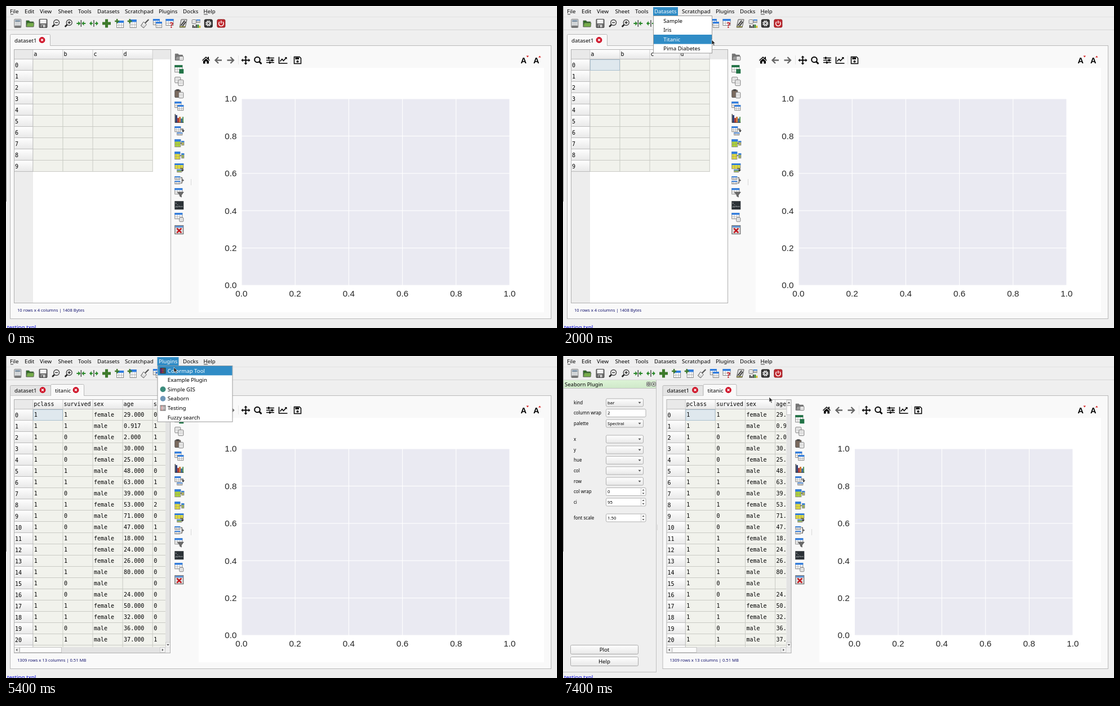
Animation of 978x573 px, one loop 8000 ms. Source, as an HTML page:

```html
<!DOCTYPE html>
<html lang="en">
<head>
<meta charset="utf-8">
<title>Table app demo</title>
<style>
html, body { margin: 0; width: 100%; height: 100%; overflow: hidden; background: #efefef; }
svg { display: block; width: 100vw; height: 100vh; }
text { font-family: "Noto Sans", "Open Sans", sans-serif; white-space: pre; }
.mono { font-family: "DejaVu Sans Mono", monospace; }
.plot { font-family: "Liberation Sans", Arial, sans-serif; }
</style>
</head>
<body>
<svg id="stage" viewBox="0 0 978 573">
  <defs>
    <linearGradient id="head" x2="0" y2="1"><stop stop-color="#fefefe"/><stop offset="1" stop-color="#e8e8e8"/></linearGradient>
    <linearGradient id="dock" x2="0" y2="1"><stop stop-color="#dcf3d6"/><stop offset="1" stop-color="#cfe8c9"/></linearGradient>
  </defs>
</svg>
<script>
const stage = document.getElementById('stage');
const BLUE = '#308cc6', LINE = '#b9b9b9', GRID = '#c9cac4';

// Markup helpers
const box = (x, y, w, h, fill, more = '') => `<rect x="${x}" y="${y}" width="${w}" height="${h}" fill="${fill}" ${more}/>`;
const frame = (x, y, w, h, fill, line = LINE, r = 0) => box(x + .5, y + .5, w - 1, h - 1, fill, `stroke="${line}" rx="${r}"`);
const text = (x, y, s, size = 9.7, more = '') => `<text x="${x}" y="${y}" font-size="${size}" ${more}>${s}</text>`;
const mono = (x, y, s) => text(x, y, s, 10, 'class="mono"');
const path = (d, fill, line = 'none', w = 1) => `<path d="${d}" fill="${fill}" stroke="${line}" stroke-width="${w}"/>`;
const dot = (x, y, r, fill, more = '') => `<circle cx="${x}" cy="${y}" r="${r}" fill="${fill}" ${more}/>`;
const at = (x, y, s) => `<g transform="translate(${x} ${y})">${s}</g>`;
const range = n => [...Array(n).keys()];

// Icon parts, drawn around 0,0
const page = (x, y, w, h, fill = '#f6f6f6') => frame(x, y, w, h, fill, '#777', 1) +
  range(Math.floor((h - 4) / 2)).map(i => box(x + 2, y + 3 + i * 2, w - 4, .6, '#aaa')).join('');
const table = (x, y, w, h, fill = '#fff', top = '#2f7de0') => frame(x, y, w, h, fill, '#858585') + box(x, y, w, h * .3, top) +
  path(`M${x + w / 3} ${y + h * .3}v${h * .7}m${w / 3} 0v${-h * .7}M${x} ${y + h * .62}h${w}`, 'none', '#8a8a8a', .6);
const lens = sign => path('M-1 1L-6 6', 'none', '#222', 2.6) + dot(1.5, -1.5, 5, '#eee', 'stroke="#444" stroke-width="1.3"') + path(sign, 'none', '#222', 1.3);
const chevrons = s => path(s, '#2c8a2c') + box(-.7, -6, 1.4, 12, '#444');
const bars = (x, y, heights, colors) => colors.map((c, i) => box(x + i * 3, y - heights[i], 2.6, heights[i], c)).join('');
const plus = (x, y, r, w) => path(`M${x - r} ${y}h${2 * r}M${x} ${y - r}v${2 * r}`, 'none', '#3d7a2b', w);
const arrow = (x, y) => path(`M${x} ${y}h4v4m-2 -2l2 2.5l2 -2.5`, 'none', '#333', 1.2);
const cross = (x, y, r, color, w) => path(`M${x - r} ${y - r}l${2 * r} ${2 * r}m0 ${-2 * r}l${-2 * r} ${2 * r}`, 'none', color, w);
const folder = (back, front) => path('M-7 6V-5h5l1.5 2H6v9z', back, '#555', .7) + path('M-7 6l2-7H7l-1 7z', front, '#555', .7);

const toolIcons = [
  page(-6, -8, 13, 16, '#e3e7ea') + box(-4, -6, 9, 3, '#7f93a6') + box(-5, 4, 11, 3, '#777'),
  folder('#2e6e25', '#75ad49'),
  frame(-7, -8, 15, 16, '#6a6a6a', '#444', 1) + box(-5, -7, 11, 7, '#f0f0f0') + box(-3, 2, 7, 5, '#c9c9c9') + box(-2, 3, 2, 4, '#444'),
  lens('M-1 -1.5h5'),
  lens('M-1 -1.5h5M1.5 -4v5'),
  chevrons('M-8 -1h3v-3l4 4l-4 4v-3h-3zM8 -1h-3v-3l-4 4l4 4v-3h3z'),
  chevrons('M-2 -1h-2v-3l-4 4l4 4v-3h2zM2 -1h2v-3l4 4l-4 4v-3h-2z'),
  plus(0, 0, 7.5, 5),
  table(-5, -5, 13, 13) + plus(-4, -4, 4, 2.4),
  table(-4, -7, 12, 15) + plus(-4, -4, 4, 2.4),
  path('M7 -7L0 0', 'none', '#555', 2.2) + path('M-2 -3L3 2L-2 8L-7 4z', '#f3f3f3', '#555') + path('M-4 0L-5 6M-1 2L-3 7', 'none', '#999', .7),
  table(-8, -8, 12, 11) + table(-3, -3, 11, 11),
  table(-8, -8, 14, 12) + text(-1, 8, '?', 14, 'fill="#c01c28" font-weight="700"'),
  path('M-6 7L-3 -7H7L4 7z', '#ddd', '#555') + path('M-4 4L3 -5M-1 5L5 -3', 'none', '#333', 1.8) + box(-6, 5, 10, 2, '#884'),
  page(-7, -7, 8, 8) + bars(-6, 8, [5, 3, 6], ['#4a4a4a', '#4a4a4a', '#4a4a4a']) + table(1, -7, 7, 6) + bars(3, 8, [6, 4], ['#3b8f31', '#d6b725']),
  frame(-7.5, -7.5, 15, 15, '#333', '#222', 2) + dot(0, 0, 4, 'none', 'stroke="#eee" stroke-width="2.4" stroke-dasharray="2.2 .9"') + dot(0, 0, 3, '#ddd') + dot(0, 0, 1.4, '#333'),
  frame(-7.5, -7.5, 15, 15, '#c2272d', '#8c1a1e', 2) + path('M-2.6 -3A4.2 4.2 0 1 0 2.6 -3M0 -5V0', 'none', '#fff', 1.5)
];
const lime = '#b2de2c', lemon = '#efe92f';
const sideIcons = [
  folder('#777', '#999') + page(0, -1, 8, 8),
  table(-8, -7, 14, 13, '#fff', '#217346') + box(0, 0, 8, 8, '#217346'),
  page(-8, -8, 11, 11) + page(-2, -3, 10, 11),
  frame(-8, -7, 11, 14, '#7a6a5e', '#555', 1) + box(-5, -8, 5, 3, '#444') + page(-1, -3, 9, 11),
  table(-8, -8, 12, 11) + table(-3, -2, 11, 10),
  path('M-7 -8V7H8', 'none', '#222', 1.2) + bars(-6, 7, [13, 8, 10, 7], ['#1b2f6b', '#a31f1f', '#c9661a', '#2a5d8f']) + box(6, -3, 1.6, 10, '#2f7d32'),
  table(-8, -8, 11, 10) + arrow(3, -3) + table(-4, 3, 10, 5),
  table(-8, -7, 11, 14, lime) + table(4, -4, 5, 8, lemon) + box(2, -.5, 3, 1, '#333'),
  table(-8, -7, 10, 14, lemon) + table(4, -4, 5, 9, lime) + box(1, -.5, 3, 1, '#333'),
  table(-8, -8, 16, 10, lemon) + table(-4, 3, 9, 5, lime) + arrow(2, 1),
  table(-8, -7, 10, 6) + table(-8, 1, 10, 6) + path('M3 -5h2v10h-2M5 0h3m-2 -2l2 2l-2 2', 'none', '#333'),
  table(-8, -8, 14, 11) + path('M-3 -1H8L4 4v4l-3 -2V4z', '#6b6b6b', '#444', .7),
  box(-8, -7, 16, 15, '#2b3136') + text(-7, -1, '&gt;_', 5, 'fill="#fff"') + text(-6.5, 4, 'python', 4, 'fill="#d8dde0"'),
  table(-8, -8, 14, 11) + page(0, 0, 8, 8),
  frame(-8, -8, 16, 16, '#ddd', '#555') + box(-7, -7, 14, 3, '#5b8fd0') + cross(0, 1.5, 4, '#c3141c', 2.6)
];
const sideY = i => 90.2 + i * 22;
const shaft = 'M6 0H-5M0 -5.5L-5.5 0L0 5.5';
const navIcons = [
  [355, path('M-7 0L0 -6.5L7 0L6 1L0 -4.5L-6 1zM-5 1.5L0 -3L5 1.5V6H1.4V2H-1.4V6H-5z', '#000') + box(3, -6, 2, 4, '#000')],
  [377, path(shaft, 'none', '#666', 2.3)],
  [398.5, `<g transform="scale(-1 1)">${path(shaft, 'none', '#666', 2.3)}</g>`],
  [425.5, path('M-6 0H6M0 -6V6', 'none', '#000', 1.8) + path('M-8 0l3-3v6zM8 0l-3-3v6zM0 -8l-3 3h6zM0 8l-3-3h6z', '#000')],
  [447, dot(-1, -1, 4.8, 'none', 'stroke="#000" stroke-width="2"') + path('M2.5 2.5L6.5 6.5', 'none', '#000', 2.8)],
  [469, path('M-7 -4H7M-7 0H7M-7 4H7', 'none', '#000', 1.4) + box(-4, -6, 2.6, 4, '#000') + box(2, -2, 2.6, 4, '#000') + box(-2, 2, 2.6, 4, '#000')],
  [491.5, path('M-7 -6V5.5H8M-5 2L-1.5 -2L1 1L6 -4.5', 'none', '#000', 1.6) + path('M3 -5.5H7V-1.5z', '#000')],
  [517.5, path('M-6 -6H3.5L6 -3.5V6H-6z', 'none', '#000', 1.5) + box(-4, -5, 6.5, 3.5, '#000') + dot(0, 2.2, 2, '#000')]
];

const menus = [['File', 7], ['Edit', 33], ['View', 60], ['Sheet', 92.5], ['Tools', 128], ['Datasets', 162],
  ['Scratchpad', 211], ['Plugins', 271], ['Docks', 314], ['Help', 350.5]];

function chrome() {
  return box(0, 0, 978, 573, '#efefef') + box(0, 0, 978, 1, '#fafafa') + box(0, 19, 978, 1, '#e2e2e2') + box(0, 42, 978, 1, '#d6d6d6') +
    box(0, 0, 1, 348, '#8a8a8a') +
    menus.map(([s, x]) => text(x, 13, s)).join('') + box(8, 14.5, 5, .8, '#111') + box(351, 14.5, 7, .8, '#111') +
    toolIcons.map((s, i) => at(20.3 + i * 22.6, 31, s)).join('') +
    text(2, 575, 'testing.txpl', 9.7, 'fill="#0000e0"');
}

function tab(x, w, name, active) {
  const y = active ? 50 : 52;
  return path(`M${x + .5} 70.5V${y + 2.5}q0 -2 2 -2H${x + w - 2.5}q2 0 2 2V70.5`, active ? '#f9f9f9' : '#e4e4e4', LINE) +
    text(x + 8, 64.5, name) + at(x + w - 15, 60.5, dot(0, 0, 5.4, '#cf1126') + cross(0, 0, 2, '#fff', 1.5));
}

const survived = '110001101001111001101', sibs = '011110102011000000001', sexes = 'fmfmfmfmfmmfffmmmffmm';
const ages = [29, .917, 2, 30, 25, 48, 63, 39, 53, 71, 47, 18, 24, 26, 80, null, 24, 50, 32, 36, 37];
const cells = i => [1, survived[i], sexes[i] === 'f' ? 'female' : 'male', ages[i] === null ? '' : ages[i].toFixed(3), sibs[i]];
const selection = frame(48, 95, 53, 20, '#dfe8ee', '#a9bfce');

// Data sheet at the left side of the pane; w is the outer width
function sheet(w, loaded) {
  const right = loaded ? 5 + w : 14 + w, rows = loaded ? 22 : 10, cols = loaded ? 5 : 4;
  const end = 95 + rows * 20, edge = 48 + cols * 53.1, id = 'view' + w + rows;
  const names = loaded ? ['pclass', 'survived', 'sex', 'age', 'sibsp'] : ['a', 'b', 'c', 'd'];
  let s = box(15, 78, right - 15, loaded ? 440 : 450, '#fff') + box(15, 78, right - 15, 17, '#e9e9e9') + box(15, 95, 33, 433, '#ededed') +
    box(48, 78, edge - 48, 17, 'url(#head)') + box(48, 95, edge - 48, rows * 20, '#f1f2ec');
  for (let i = 0; i < rows; i++) {
    const y = 95 + i * 20;
    s += box(15, y, 33, 20, 'url(#head)') + box(15, y + 19, 33, 1, '#bbb') + box(48, y + 19, edge - 48, 1, GRID);
    if (i < 21) s += mono(16, y + 13.5, i);
  }
  for (let c = 0; c <= cols; c++) {
    const x = 47.3 + c * 53.1;
    s += box(x, 78, 1, 17, '#ccc') + box(x, 95, 1, end - 95, c ? GRID : '#bbb');
  }
  s += box(15, 94, edge - 15, 1, '#bbb');
  if (loaded) s += selection;
  names.forEach((n, c) => s += mono(49.3 + c * 53.1, 88.5, n));
  if (loaded) range(21).forEach(i => cells(i).forEach((v, c) => s += mono(49.8 + c * 53.1, 108 + i * 20, v)));
  s = `<clipPath id="${id}">${box(14, 77, right - 14, loaded ? 441 : 451, '#000')}</clipPath><g clip-path="url(#${id})">${s}</g>`;
  if (loaded) {
    const track = right - 34, tip = (x, y, d) => at(x, y, path(d, '#555'));
    s += box(right, 78, 9, 440, '#e3e3e3') + frame(right, 78, 9, 10, '#f3f3f3', '#ccc') + frame(right, 88, 9, 17, '#fafafa', '#c4c4c4') + frame(right, 509, 9, 10, '#f3f3f3', '#ccc') +
      tip(right + 4.5, 83, 'M-2.3 1.2L0 -1.5L2.3 1.2z') + tip(right + 4.5, 514, 'M-2.3 -1.2L0 1.5L2.3 -1.2z') +
      box(15, 518, w - 2, 10, '#e3e3e3') + frame(14, 518, 10, 10, '#f3f3f3', '#ccc') + frame(24, 518, Math.round(track * (right - 48) / 781), 10, '#fafafa', '#c4c4c4') +
      frame(right - 10, 518, 10, 10, '#f3f3f3', '#ccc') + box(right, 519, 9, 9, '#efefef') +
      tip(19, 523, 'M1.2 -2.3L-1.5 0L1.2 2.3z') + tip(right - 5, 523, 'M-1.2 -2.3L1.5 0L-1.2 2.3z');
  }
  return s + frame(14, 77, w, 452, 'none', '#b0b0b0') +
    text(20, 543.5, loaded ? '1309 rows x 13 columns | 0.51 MB' : '10 rows x 4 columns | 1408 Bytes', 7.6, 'fill="#14146e"');
}

function plot(dx, x0, x1) {
  const label = 'class="plot" fill="#262626" text-anchor=';
  let s = box(342 + dx, 110, 613 - dx, 435, '#fff') + box(x0, 165, x1 - x0, 332, '#eaeaf2');
  range(6).forEach(i => {
    const x = x0 + (x1 - x0) * i / 5, y = 497 - i * 66.4, v = (i / 5).toFixed(1);
    s += box(x - .5, 165, 1.1, 332, '#fff') + box(x0, y - .5, x1 - x0, 1.1, '#fff') +
      text(x, 517, v, 15.3, label + '"middle"') + text(x0 - 8.5, y + 5.4, v, 15.3, label + '"end"');
  });
  return s;
}

function layout(left, dx, w, loaded, x0, x1) {
  const tabs = loaded ? tab(7, 73, 'dataset1', false) + tab(79, 60, 'titanic', true) : tab(7, 72, 'dataset1', true);
  const gap = loaded ? [79, 60] : [7, 72];
  const letter = (x, d) => at(x, 96, text(-5.5, 5.5, 'A', 14.5, 'class="plot" font-weight="700"') + path(d, '#d81e1e'));
  return frame(left + 7, 70, 961 - left, 487, '#f9f9f9') +
    at(left, 0, tabs + box(gap[0] + 1, 70, gap[1] - 2, 1, '#f9f9f9') + sheet(w, loaded)) +
    sideIcons.map((s, i) => at(307.3 + dx, sideY(i), s)).join('') + box(328 + dx, 308, 1, 11, '#d9d9d9') +
    plot(dx, x0, x1) +
    navIcons.map(([x, s]) => at(x + dx, 96.5, s)).join('') + box(412 + dx, 88, 1, 16, '#e6e6e6') + box(505 + dx, 88, 1, 16, '#e6e6e6') +
    letter(919, 'M4.5 -7.5h4.5l-2.2 3z') + letter(941.5, 'M3.5 -4.5h4.5l-2.2 -3z');
}

// Side panel with its form
function panel() {
  const rows = [['kind', 83, 'bar', 'c'], ['column wrap', 101.5, '2', 'e'], ['palette', 120, 'Spectral', 'c'], ['x', 148, '', 'c'], ['y', 167, '', 'c'],
    ['hue', 185.5, '', 'c'], ['col', 204, '', 'c'], ['row', 223, '', 'c'], ['col wrap', 241.5, '0', 's'], ['ci', 260, '95', 's'], ['font scale', 288, '1.50', 's']];
  const button = (y, s) => frame(13, y, 121, 17, 'url(#head)', '#ababab', 2) + text(73.5, y + 12, s, 9.7, 'text-anchor="middle"');
  let s = box(1, 43, 165, 15, 'url(#dock)') + text(3, 53.5, 'Seaborn Plugin', 9.5) +
    frame(148, 46, 8, 8, '#e3efdf', '#666', 1) + frame(157, 46, 8, 8, '#e3efdf', '#666', 1) + cross(161, 50, 1.8, '#333', 1) + frame(150, 48, 4, 4, 'none', '#444') +
    box(165, 43, 1, 520, '#c0c0c0') + box(1, 57, 165, 1, '#c0c0c0') + box(0, 562, 166, 1, '#c0c0c0') + box(167, 300, 1, 10, '#d4d4d4');
  for (const [name, y, value, kind] of rows) {
    s += text(19, y + 2.8, name, 8) + frame(76, y - 7.5, kind === 'c' ? 67 : 71.5, 15, kind === 'c' ? 'url(#head)' : '#fff', '#b0b0b0', 2) + text(79, y + 2.8, value, 7.8);
    if (kind === 'c') s += path(`M133.5 ${y - 1.3}h5l-2.5 3z`, '#555');
    if (kind === 's') s += box(138, y - 7, 1, 14, '#ccc') + path(`M140.5 ${y - 2}h4l-2 -2.5zM140.5 ${y + 2}h4l-2 2.5z`, '#555');
  }
  return s + button(514, 'Plot') + button(535, 'Help');
}

// Drop-down menus
const pluginIcons = [
  frame(-5, -5, 10, 10, '#37205f', '#222') + range(9).map(i => box(-4 + i % 3 * 3, -4 + (i / 3 | 0) * 3, 2, 2, ['#9b2d7a', '#d8632f', '#4a8f52'][i % 3])).join(''), '',
  dot(0, 0, 5, '#3c8c7c'), dot(0, 0, 4.8, '#6f97b8'),
  frame(-5, -5, 10, 10, '#e8e2e2', '#666') + [-3, 0, 3].map(y => box(-3, y - .6, 2, 1.4, '#b23b3b') + box(0, y - .4, 3.5, 1, '#555')).join(''), ''
];
const drops = {
  data: { x: 160, w: 105, items: ['Sample', 'Iris', 'Titanic', 'Pima Diabetes'], icons: [], title: ['Datasets', 162, 44] },
  plug: { x: 268.5, w: 134, items: ['Colormap Tool', 'Example Plugin', 'Simple GIS', 'Seaborn', 'Testing', 'Fuzzy search'], icons: pluginIcons, title: ['Plugins', 271, 38] }
};
const STEP = 16.6;
const title = ({ x, title: [s, tx, w] }) => box(x, 2, w, 15, BLUE) + text(tx, 13, s, 9.7, 'fill="#fff"');
const list = (d, on) => frame(d.x, 17, d.w, d.items.length * STEP + 1, '#fff', '#9a9a9a') + d.items.map((s, i) => {
  const y = 17.8 + i * STEP;
  return (i === on ? box(d.x + 1, y, d.w - 2, STEP, BLUE) : '') + (d.icons[i] ? at(278.5, y + 8.3, d.icons[i]) : '') +
    text(d.x + 18.3, y + 11.8, s, 9.7, i === on ? 'fill="#fff"' : '');
}).join('');

const layer = s => {
  const g = document.createElementNS('http://www.w3.org/2000/svg', 'g');
  g.innerHTML = s;
  stage.append(g);
  return g;
};
const show = (g, on) => g.setAttribute('display', on ? 'inline' : 'none');

layer(chrome());
const empty = layer(layout(0, 0, 279, false, 418, 894));
const picked = layer(selection);
const filled = layer(layout(0, 0, 278, true, 418, 894));
const docked = layer(layout(169.5, 113, 222, true, 517.3, 905) + panel());
const popup = layer('');
const cursor = layer(path('M0 0V9.2L2.1 7.3L3.6 10.7L5.1 10L3.6 6.7H6.4z', '#222', '#fff', .6));

// Pointer stops: time, x, y
const stops = [[0, 45, -14], [100, 66, 1], [600, 250, 27], [700, 250, 27], [800, 262, 27], [900, 262, 25], [1200, 186, 11], [1400, 186, 11],
  [1600, 211, 30], [2000, 264, 60], [3300, 264, 60], [3400, 254, 60], [4200, 254, 60], [4700, 291, 11], [5300, 291, 11],
  [5400, 298, 20], [5900, 366, 72], [6000, 366, 72], [6100, 366, 73], [8000, 366, 73]];
function pointer(t) {
  const i = stops.findIndex(s => s[0] > t), [t0, x0, y0] = stops[i - 1], [t1, x1, y1] = stops[i];
  const k = (t - t0) / (t1 - t0);
  return [x0 + (x1 - x0) * k, y0 + (y1 - y0) * k];
}

let last = -1;
function draw(now) {
  const t = Math.floor(now % 8000 / 100) * 100;
  if (t === last) return;
  last = t;
  const [x, y] = pointer(t), within = (a, b) => t >= a && t < b;
  const on = y < 18 ? -1 : Math.floor((y - 17.8) / STEP);
  show(empty, t < 3800);
  show(picked, within(1300, 3800));
  show(filled, within(3800, 7400));
  show(docked, t >= 7400);
  popup.innerHTML =
    (within(1300, 3800) ? title(drops.data) : '') + (within(1400, 3400) ? list(drops.data, on) : '') +
    (within(5000, 7400) ? title(drops.plug) : '') + (within(5100, 7300) ? list(drops.plug, on) : '');
  cursor.setAttribute('transform', `translate(${x} ${y})`);
}

const start = performance.now();
(function tick() {
  draw(performance.now() - start);
  requestAnimationFrame(tick);
})();
</script>
</body>
</html>
```
